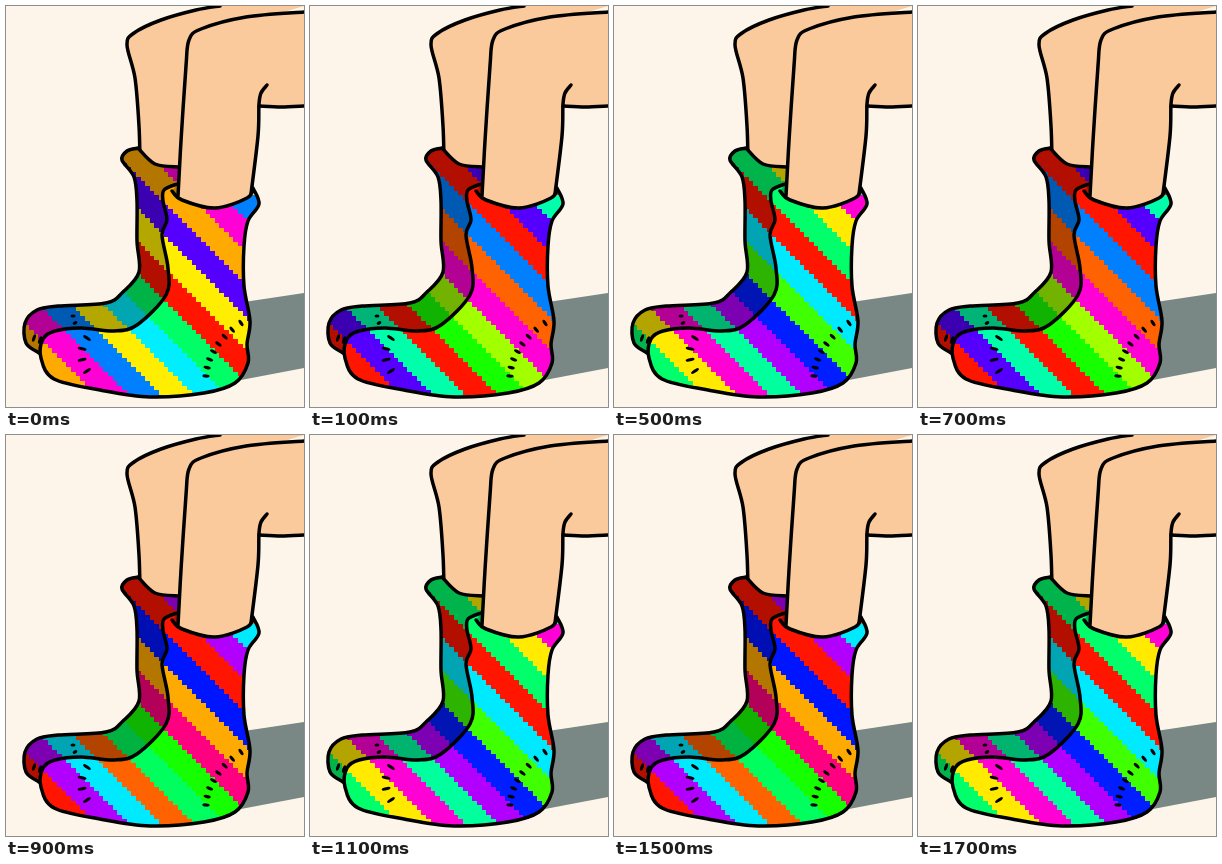
An HTML page with a canvas that plays this animation: 298 by 401 pixels, repeating every 6.8 s.

```html
<!DOCTYPE html>
<html lang="en">
<head>
<meta charset="utf-8">
<title>Striped socks</title>
<style>
html, body { margin: 0; width: 100%; height: 100%; overflow: hidden; background: #fdf5e9; }
canvas { display: block; }
</style>
</head>
<body>
<canvas id="stage" width="298" height="401"></canvas>
<script>
const ctx = document.getElementById('stage').getContext('2d');
const STEP = 100, LAST = 17, LOOP = 6800;
const CELL = 4.64, BAND = 7; // stair size, and stairs per stripe
const SKIN = '#fbca9c';

// Smooth curve through the points of each run; runs are joined at corners.
function curve(...runs) {
  const path = new Path2D();
  runs.forEach((run, r) => {
    const p = run.split(' ').map(s => s.split(',').map(Number));
    const at = i => p[Math.max(0, Math.min(p.length - 1, i))];
    if (r) path.lineTo(...p[0]); else path.moveTo(...p[0]);
    for (let i = 0; i < p.length - 1; i++) {
      const [a, b, c, d] = [at(i - 1), at(i), at(i + 1), at(i + 2)];
      path.bezierCurveTo(
        b[0] + (c[0] - a[0]) / 6, b[1] + (c[1] - a[1]) / 6,
        c[0] - (d[0] - b[0]) / 6, c[1] - (d[1] - b[1]) / 6, ...c);
    }
  });
  return path;
}

const backShin = '214,0 190,4 155,14 128,27 121,39 129,72 133,120 134,156';
const frontShin = '298,6 240,11 195,23 183,34 180,60 175,135 172,190';
const calf = '261,79 255,87 253,98 252,130 245,188';
const thigh = '253,100 275,101 298,100';

const backLeg = curve(backShin, '134,165 176,165', '200,30 298,0');
const frontLeg = curve(frontShin, '172,195 209,206 243,196', '245,188 252,130 253,100', thigh);
const backSock = curve(
  '132,142 121,145 116,154 128,171 131,195 131,235 133,266 117,286 100,297 52,300 31,304 19,317 20,337 33,347',
  '60,340 140,330 174,240 174,163', '173,161 149,158 132,142');
const frontSock = curve(
  '171,178 158,184 157,195 161,214 156,229 162,262 160,289 131,319 108,325 75,322 49,325 37,333 35,352 48,373 94,384 144,391 198,387 229,377 242,357 241,338 244,315 238,280 238,240 242,215 253,198 247,182',
  '247,182 241,192 209,202 176,194 166,185');
const shadow = new Path2D('M238 296L298 287V362L235 374Z');

// Hues of the nine repeating stripes, as seen in four phases.
const base = [40, 260, 56, 5, 144, 184, 56, 210, 310];
const turn = deg => base.map(h => h + deg);
const palettes = [
  base,
  [5, 210, 23, 310, 82, 115, 5, 160, 260],
  turn(127),
  [5, 235, 40, 330, 115, 142, 23, 185, 282],
  turn(-77),
  [145, 5, 185, 105, 233, 282, 157, 310, 55]];

// Diagonal stripes in stair steps, the same pattern behind both socks.
function fillStripes(shape, hues, light) {
  ctx.save();
  ctx.clip(shape);
  for (let i = 2; i < 56; i++) {
    for (let j = 27; j < 84; j++) {
      const n = Math.floor((j - i) / BAND) + hues.length;
      ctx.fillStyle = `hsl(${hues[n % hues.length]},100%,${light}%)`;
      ctx.fillRect(Math.round(i * CELL), Math.round(j * CELL + 8.3), 5, 5);
    }
  }
  ctx.restore();
}

function fill(path, color) {
  ctx.fillStyle = color;
  ctx.fill(path);
}

// Stitches across a seam that bends from a to b towards c.
function seam([ax, ay], [cx, cy], [bx, by], count, size) {
  ctx.fillStyle = '#000';
  for (let i = 0; i < count; i++) {
    const t = i / (count - 1), u = 1 - t;
    const mix = (a, c, b) => u * u * a + 2 * u * t * c + t * t * b;
    const slope = (a, c, b) => u * (c - a) + t * (b - c);
    const angle = Math.atan2(-slope(ax, cx, bx), slope(ay, cy, by));
    ctx.beginPath();
    ctx.ellipse(mix(ax, cx, bx), mix(ay, cy, by), size, 1.6, angle, 0, 7);
    ctx.fill();
  }
}

function draw(hues) {
  ctx.fillStyle = '#fdf5e9';
  ctx.fillRect(0, 0, 298, 401);
  ctx.lineWidth = 3.5;
  ctx.lineCap = ctx.lineJoin = 'round';
  fill(shadow, '#7a8885');

  fill(backLeg, SKIN);
  ctx.stroke(curve(backShin));
  fillStripes(backSock, hues, 35);
  ctx.stroke(backSock);
  seam([67, 310], [67, 313], [69, 317], 2, 2.5);
  seam([28, 332], [31, 333], [34, 334], 2, 4);

  fill(frontLeg, SKIN);
  for (const line of [frontShin, calf, thigh]) ctx.stroke(curve(line));
  fillStripes(frontSock, hues, 50);
  ctx.stroke(frontSock);
  seam([81, 332], [70, 348], [81, 365], 4, 4.5);
  seam([235, 317], [202, 340], [200, 370], 8, 3.7);
}

const start = performance.now();
let shown = -1;
function tick() {
  const t = (performance.now() - start) % LOOP;
  const phase = Math.min(LAST, Math.floor(t / STEP)) % palettes.length;
  if (phase !== shown) draw(palettes[shown = phase]);
  requestAnimationFrame(tick);
}
tick();
</script>
</body>
</html>
```
